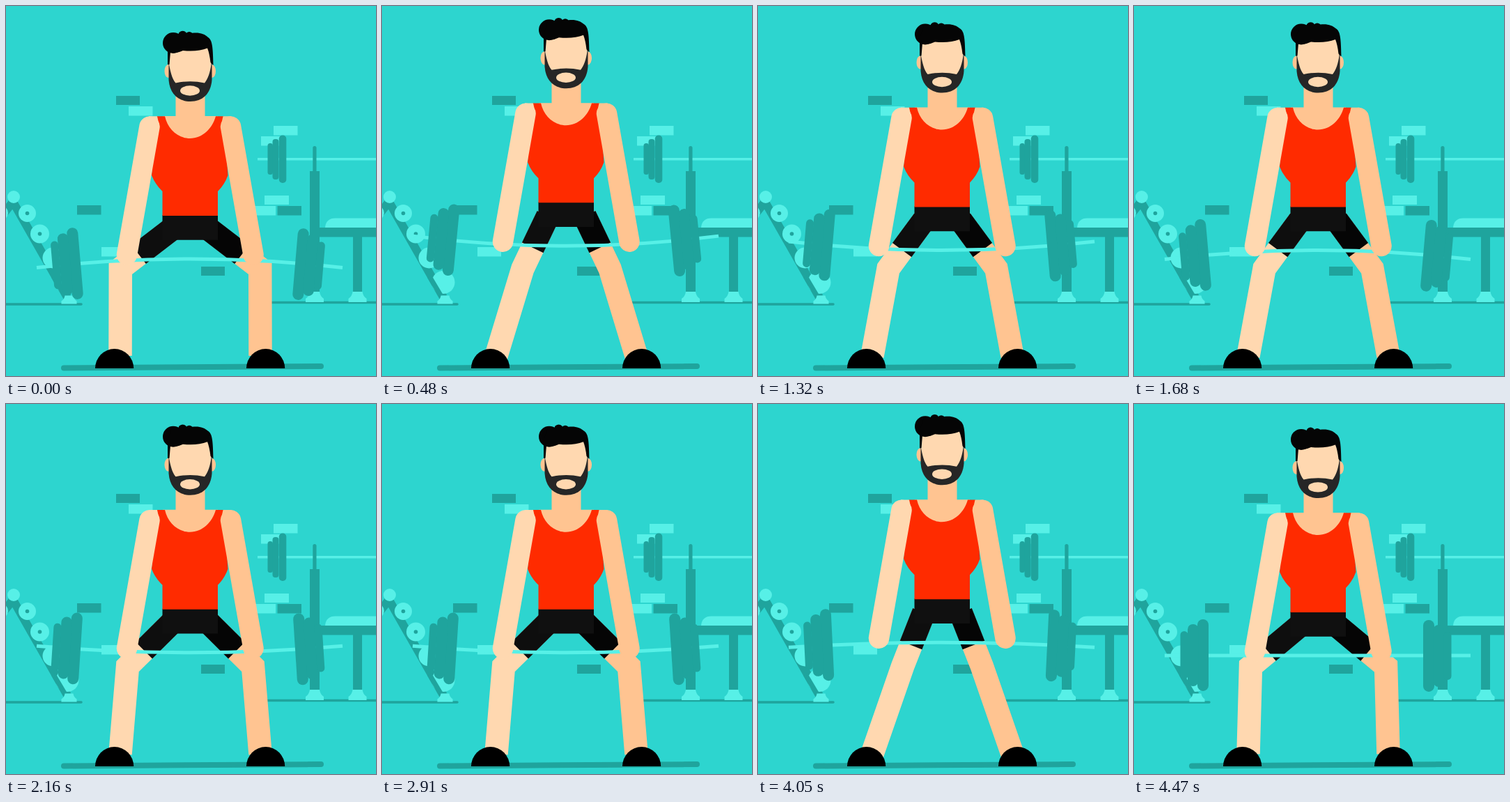
These frames come from a looping animation (531 px wide and 531 px high, 4500 ms). An HTML page:

```html
<!DOCTYPE html>
<html lang="en">
<head>
<meta charset="utf-8">
<title>Deadlift</title>
<style>
  html, body { margin: 0; width: 100%; height: 100%; overflow: hidden; background: #2dd5cf; }
  svg { display: block; width: 100vw; height: 100vh; }
  .dark { fill: #1fa49d; }
  .light { fill: #57f0e7; }
  .line { fill: none; stroke: #1fa49d; }
  .pale { color: #ffd8b0; }
  .tan { color: #ffc491; }
  .skin { fill: currentColor; }
  .limb { fill: none; stroke: currentColor; }
</style>
</head>
<body>
<svg viewBox="0 0 531 531">
  <defs>
    <path id="leg" class="limb" stroke-width="33.5" stroke-linejoin="miter"/>
    <path id="short" class="limb" stroke-width="34"/>
    <g id="arm">
      <path class="limb" stroke-width="29.5" stroke-linecap="round" d="M206 173L173.5 357"/>
      <path class="skin" d="M205 158.2H217L220 172H205Z"/>
    </g>
    <g id="plates" class="dark">
      <rect x="-8" y="-51.5" width="16" height="103" rx="8"/>
      <rect x="-22" y="-44.5" width="15.5" height="89" rx="7.5"/>
      <rect x="-32.5" y="-34.5" width="11" height="69" rx="5.5"/>
    </g>
    <path id="foot" class="light" d="M-7 0H7Q8 7 13 10V15H-13V10Q-8 7 -7 0Z"/>
    <path id="shoe" d="M128 520A27.6 28 0 0 1 183.2 520Z"/>
  </defs>

  <!-- wall bricks -->
  <path class="dark" d="M158 129h34v13h-34zM102 286h34.500v13.500h-34.500zM280 374h34v13h-34z"/>
  <path class="light" d="M176 144h34.500v13.500h-34.500zM137 346h34v13.500h-34zM384 172h34.500v13.500h-34.500zM366 187h34v13.500h-34zM371 272h35v13h-35zM353 287h34v13.500h-34z"/>
  <path class="dark" d="M389.500 287h34.500v13.500h-34.500z"/>

  <!-- rack on the left -->
  <path class="line" stroke-width="3.500" stroke-linecap="round" d="M-4 428H108"/>
  <path class="line" stroke-width="12" d="M-8 304L10 281L88 418"/>
  <g class="light">
    <circle cx="11" cy="274" r="9"/>
    <circle cx="-8" cy="297" r="11"/>
    <circle cx="30.500" cy="297.500" r="12.500"/>
    <circle cx="48.500" cy="327" r="13.500"/>
    <circle cx="67.500" cy="361.500" r="15"/>
    <circle cx="88" cy="396.500" r="16.500"/>
  </g>
  <circle class="dark" cx="30.500" cy="297.500" r="2.800"/>
  <circle class="dark" cx="48.500" cy="327" r="2.800"/>
  <path class="line" stroke-width="7" d="M68 388L87 420"/>
  <use href="#foot" transform="translate(90.500 415.500) scale(.85 .8)"/>

  <!-- bench on the right -->
  <path class="light" d="M361 218h170v3.600h-170z"/>
  <g class="dark">
    <rect x="375.500" y="197" width="7.500" height="45" rx="3.500"/>
    <rect x="382.500" y="191" width="9" height="58" rx="4"/>
    <rect x="391.800" y="185.500" width="10.500" height="68.500" rx="5"/>
    <rect x="440.300" y="201" width="5.200" height="50" rx="2.600"/>
    <path d="M436 237h14v81h81v13.500h-20v80h-13v-80h-48v80h-14z"/>
  </g>
  <path class="light" d="M458 318Q459 304.500 473 304.500H531V318Z"/>
  <path class="line" stroke-width="3.500" d="M352 425.500H531"/>
  <use href="#foot" x="443" y="410"/>
  <use href="#foot" x="504.500" y="410"/>

  <path class="line" stroke-width="8" stroke-linecap="round" d="M83 519.500L452 517"/>

  <!-- athlete -->
  <use href="#leg" class="pale"/>
  <use href="#leg" class="tan" transform="matrix(-1 0 0 1 529 0)"/>
  <use href="#short" color="#0e0e0e"/>
  <use href="#short" color="#050505" transform="matrix(-1 0 0 1 529 0)"/>

  <g class="lift">
    <path fill="#101010" d="M224.500 300H304V335.800H224.500Z"/>
    <path class="tan skin" d="M243.500 120H285.500V158H304V195H225V158H243.500Z"/>
    <path fill="#ff2b00" d="M216 158.300H228C232 176 246 190 264 190S296 176 301 158.300H312.500L318.500 243Q314 256 304 266V301H224.500V266Q214 256 209 243Z"/>

    <ellipse class="tan skin" cx="233" cy="93.500" rx="5.500" ry="9.500"/>
    <ellipse class="tan skin" cx="295.500" cy="93.500" rx="5.500" ry="9.500"/>
    <path fill="#262626" d="M233.500 78V106C235 126 247 137 264.500 137S294 126 295.500 106V78Z"/>
    <path class="pale skin" d="M235 58H293L294.500 84C293 95 290 104 285 110.500Q264.500 106 243.500 110.500C238 104 236 94 234 84Z"/>
    <ellipse class="pale skin" cx="264" cy="121.500" rx="14" ry="7.200"/>
    <g fill="#050505">
      <circle cx="240" cy="53" r="15"/>
      <circle cx="253.500" cy="42" r="6.300"/>
      <circle cx="263" cy="42.500" r="5.500"/>
      <path d="M232 84V58L238 40H262C274 37 284 39 290 45C296 49 297 58 297.500 85L293.500 81Q292 68 289 60.500Q275 66 254 64Q244 69 236 66L234.500 84Z"/>
    </g>
  </g>

  <path id="bar" fill="none" stroke="#57f0e7" stroke-width="5"/>
  <use href="#plates" id="left"/>
  <use href="#plates" id="right"/>

  <g class="lift">
    <use href="#arm" class="pale"/>
    <use href="#arm" class="tan" transform="matrix(-1 0 0 1 528.500 0)"/>
  </g>
  <use href="#shoe"/>
  <use href="#shoe" x="217"/>
</svg>
<script>
  const PERIOD = 750, STEP = 30, MID = 264, HALF = 220;
  const $ = id => document.getElementById(id);
  const lifts = document.querySelectorAll('.lift');

  // [share of half cycle, bar bend]
  const BEND = [[0, 0], [.08, 12.5], [.3, 14.5], [.56, 13], [.84, 9.5], [1, 0]];

  function bendAt(t) {
    const h = (t + 30) % PERIOD, half = PERIOD / 2;
    const u = h % half / half;
    const i = BEND.findIndex(p => p[0] > u);
    const [a, b] = [BEND[i - 1], BEND[i]];
    const v = a[1] + (b[1] - a[1]) * (u - a[0]) / (b[0] - a[0]);
    return h < half ? v : -v;
  }

  // Linear rise and fall with a short hold at the top
  const riseAt = t => Math.min(23, Math.min(t, PERIOD - t) * .0694);

  function drawLegs(rise) {
    const kx = 164.3 + 1.45 * rise + .03 * rise * rise, ky = 376.7;
    const hx = 238, hy = 320 - rise;
    const k = 33 / Math.hypot(hx - kx, hy - ky);
    $('leg').setAttribute('d', `M164 502L${kx} ${ky}L${hx} ${hy}`);
    $('short').setAttribute('d', `M${kx + (hx - kx) * k} ${ky + (hy - ky) * k}L${hx} ${hy}`);
  }

  function drawBar(rise, bend) {
    const y = 363 - rise;
    $('bar').setAttribute('d', `M${MID - HALF} ${y + bend}Q${MID} ${y - bend} ${MID + HALF - 1} ${y + bend}`);
    const u = 165 / HALF, py = y + bend * u * u - .5;
    const tilt = Math.atan(2 * bend * u / HALF) * 180 / Math.PI;
    $('left').setAttribute('transform', `translate(99 ${py}) rotate(${-tilt})`);
    $('right').setAttribute('transform', `translate(423 ${py + 1}) rotate(${tilt}) scale(-1 1)`);
  }

  function draw() {
    const t = Math.floor(performance.now() / STEP) * STEP % PERIOD;
    const rise = riseAt(t);
    lifts.forEach(g => g.setAttribute('transform', `translate(0 ${-rise})`));
    drawLegs(rise);
    drawBar(rise, bendAt(t));
    requestAnimationFrame(draw);
  }
  draw();
</script>
</body>
</html>
```
